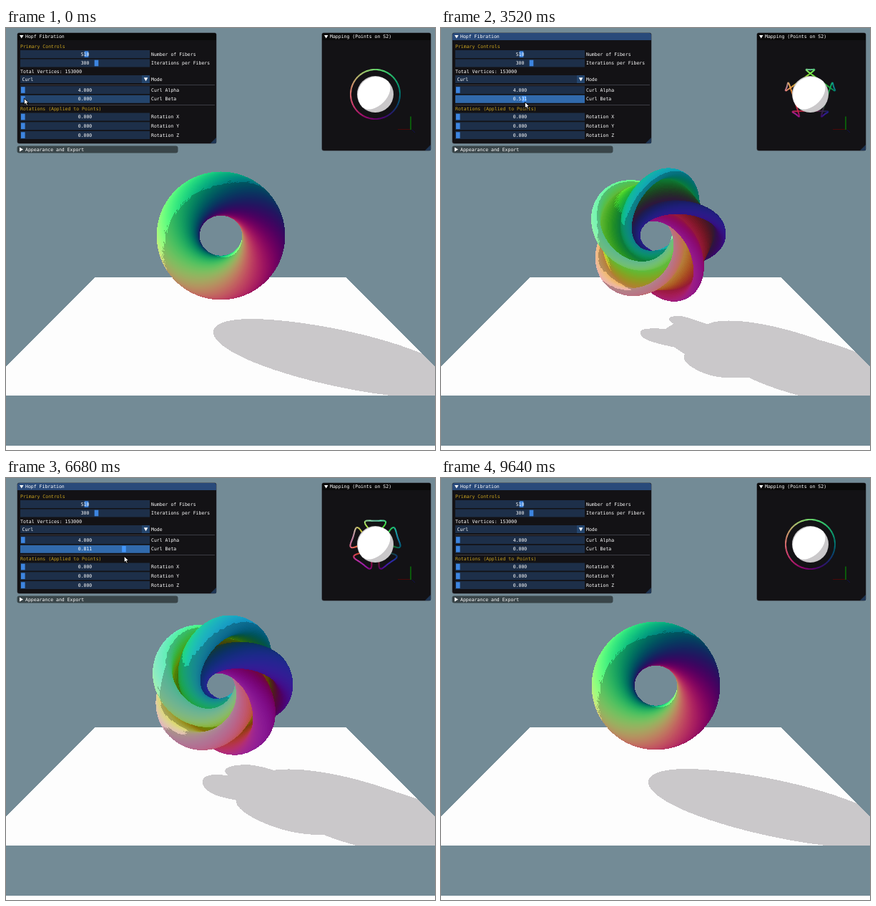
Animation of 600x589 px, one loop 9680 ms. Source, as an HTML page with a canvas:

```html
<!DOCTYPE html>
<html>
<head>
<meta charset="utf-8">
<title>Hopf Fibration</title>
<style>
html, body { margin: 0; height: 100%; overflow: hidden; }
canvas { display: block; width: 100vw; height: 100vh; }
</style>
</head>
<body>
<canvas id="stage" width="600" height="589"></canvas>
<script>
const ctx = document.getElementById('stage').getContext('2d');
const W = 600, H = 583, LOOP = 9680, TAU = 2 * Math.PI;
const SKY = 0xff968b73, GROUND = 0xfffdfdfd, SHADE = 0xffcac8ca;

// time, beta, cursor offset from the slider grab, cursor height
const KEYS = [
  [0, 0, 1.5, 98], [400, 0, 1.5, 98], [1000, .05, 2, 100], [1720, .292, 3, 101],
  [2720, .837, -.5, 101], [3050, .95, 0, 102], [3500, .55, 1, 103], [4000, .085, 1, 105],
  [4440, .032, 0, 106], [4700, .025, 0, 106], [5000, .1, 2, 106], [5680, .776, 5, 106],
  [6200, 1, 4, 107], [6700, .8, 0, 109], [7000, .52, -3, 110], [7600, .202, -5.5, 111],
  [8000, .07, -4, 112], [8800, 0, -2, 112], [LOOP, 0, -2, 112]
];
const PRESS = 400, RELEASE = 9200;

// Monotone cubic interpolation of one column of KEYS
function track(time, col) {
  const rise = k => KEYS[k] && KEYS[k + 1]
    ? (KEYS[k + 1][col] - KEYS[k][col]) / (KEYS[k + 1][0] - KEYS[k][0]) : 0;
  const tangent = k => {
    const a = rise(k - 1), b = rise(k);
    return a * b > 0 ? 2 * a * b / (a + b) : 0;
  };
  let k = 0;
  while (k < KEYS.length - 2 && time >= KEYS[k + 1][0]) k++;
  const span = KEYS[k + 1][0] - KEYS[k][0], u = (time - KEYS[k][0]) / span, v = 1 - u;
  return v * v * (1 + 2 * u) * KEYS[k][col] + u * u * (3 - 2 * u) * KEYS[k + 1][col]
    + span * u * v * (v * tangent(k) - u * tangent(k + 1));
}

// ---- scene ----
const FIBERS = 320, STEPS = 110, COUNT = FIBERS * STEPS;
const points = () => ({ x: new Float32Array(COUNT), y: new Float32Array(COUNT), z: new Float32Array(COUNT) });
const world = points(), view = points(), cast = points(), light = points();
const tint = Array.from({ length: FIBERS }, () => [0, 0, 0]);
const depth = new Float32Array(W * H), lightDepth = new Float32Array(W * H);
const image = ctx.createImageData(W, 589);
const pixels = new Uint32Array(image.data.buffer);

const backdrop = new Uint32Array(pixels.length).fill(SKY);
for (let y = 348; y < 513; y++) {
  const half = y - 172;
  backdrop.fill(GROUND, y * W + Math.max(0, 300 - half), y * W + Math.min(W, 300 + half));
}
backdrop.fill(0xffffffff, H * W);

const CAM_Y = 1, CAM_Z = 6, DIST = Math.hypot(CAM_Y, CAM_Z);
const SIN = CAM_Y / DIST, COS = CAM_Z / DIST, FOCAL = 725;
function project(out, n, x, y, z) {
  const inv = 1 / (DIST - y * SIN - z * COS);
  out.x[n] = 300 + FOCAL * x * inv;
  out.y[n] = 290 - FOCAL * (y * COS - z * SIN) * inv;
  out.z[n] = inv;
}

// Curl curve in the plane, lifted to the sphere by inverse stereographic projection
function basePoint(t, beta) {
  const re = -Math.sin(t) + beta * Math.sin(4 * t);
  const im = Math.cos(t) + beta * Math.cos(4 * t);
  const r = Math.hypot(re, im), s = 1 + r * r;
  return { r, angle: Math.atan2(im, re), x: 2 * re / s, y: 2 * im / s, z: (r * r - 1) / s };
}
const colorOf = p => [(1 - p.x) * 127.5, (1 + p.y) * 127.5, (1 + p.z) * 127.5];

function buildFibers(beta) {
  const far = 20;
  for (let i = 0, n = 0; i < FIBERS; i++) {
    const p = basePoint(TAU * i / FIBERS, beta);
    tint[i] = colorOf(p);
    const c = 1 / Math.hypot(1, p.r), s = p.r * c;
    for (let j = 0; j < STEPS; j++, n++) {
      const g = TAU * j / STEPS, a = p.angle - g - .7 * Math.PI, w = s * Math.cos(g);
      const k = Math.acos(w) / Math.PI / Math.sqrt(1 - w * w);
      const x = world.x[n] = k * c * Math.cos(a);
      const y = world.y[n] = k * c * Math.sin(a);
      const z = world.z[n] = k * s * Math.sin(g);
      project(view, n, x, y, z);
      const m = (far + 1) / (far - y);
      project(cast, n, (x + far) * m - far, -1, (z + far) * m - far);
      light.x[n] = 300 + 85 * (x - z);
      light.y[n] = 290 + 49 * (x + 2 * y + z);
      light.z[n] = .577 * (y - x - z);
    }
  }
}

function fillTriangle(p, a, b, c, plot) {
  const ax = p.x[a], ay = p.y[a], az = p.z[a];
  const ux = p.x[b] - ax, uy = p.y[b] - ay, vx = p.x[c] - ax, vy = p.y[c] - ay;
  const det = ux * vy - uy * vx;
  if (!det) return;
  const du = p.z[b] - az, dv = p.z[c] - az;
  const left = Math.max(0, Math.ceil(ax + Math.min(0, ux, vx)));
  const right = Math.min(W - 1, ax + Math.max(0, ux, vx));
  const bottom = Math.min(H - 1, ay + Math.max(0, uy, vy));
  for (let y = Math.max(0, Math.ceil(ay + Math.min(0, uy, vy))); y <= bottom; y++) {
    for (let x = left; x <= right; x++) {
      const px = x - ax, py = y - ay;
      const u = (px * vy - py * vx) / det, v = (ux * py - uy * px) / det;
      if (u > -1e-4 && v > -1e-4 && u + v < 1.0001) plot(y * W + x, az + u * du + v * dv);
    }
  }
}

function eachQuad(visit) {
  for (let i = 0; i < FIBERS; i++) {
    const row = i * STEPS, next = (i + 1) % FIBERS * STEPS;
    for (let j = 0; j < STEPS; j++) {
      const k = (j + 1) % STEPS;
      visit(row + j, row + k, next + j, next + k, i);
    }
  }
}
function fillQuad(p, a, b, c, d, plot) {
  fillTriangle(p, a, b, c, plot);
  fillTriangle(p, b, d, c, plot);
}

function isLit(a, b, c, d) {
  const { x, y, z } = world;
  const ux = x[d] - x[a], uy = y[d] - y[a], uz = z[d] - z[a];
  const vx = x[c] - x[b], vy = y[c] - y[b], vz = z[c] - z[b];
  const nx = uy * vz - uz * vy, ny = uz * vx - ux * vz, nz = ux * vy - uy * vx;
  const facing = -nx * x[a] + ny * (CAM_Y - y[a]) + nz * (CAM_Z - z[a]);
  if ((ny - nx - nz) * facing <= 0) return false;
  const spot = Math.round(light.y[a]) * W + Math.round(light.x[a]);
  return light.z[a] > lightDepth[spot] - .04;
}

function drawScene(beta) {
  buildFibers(beta);
  pixels.set(backdrop);
  depth.fill(0);
  lightDepth.fill(-9);
  const plotLight = (n, z) => { if (z > lightDepth[n]) lightDepth[n] = z; };
  const plotCast = n => { if (pixels[n] === GROUND) pixels[n] = SHADE; };
  eachQuad((a, b, c, d) => {
    fillQuad(light, a, b, c, d, plotLight);
    fillQuad(cast, a, b, c, d, plotCast);
  });
  let color;
  const plotView = (n, z) => {
    if (z > depth[n]) { depth[n] = z; pixels[n] = color; }
  };
  eachQuad((a, b, c, d, i) => {
    const k = isLit(a, b, c, d) ? 1 : .76, [red, green, blue] = tint[i];
    color = (255 << 24 | blue * k << 16 | green * k << 8 | red * k) >>> 0;
    fillQuad(view, a, b, c, d, plotView);
  });
  ctx.putImageData(image, 0, 0);
}

// ---- interface ----
function box(x, y, w, h, color, radius = 0) {
  ctx.fillStyle = color;
  ctx.beginPath();
  ctx.roundRect(x, y, w, h, radius);
  ctx.fill();
}
function poly(color, ...xy) {
  ctx.fillStyle = color;
  ctx.beginPath();
  for (let i = 0; i < xy.length; i += 2) ctx.lineTo(xy[i], xy[i + 1]);
  ctx.closePath();
  ctx.fill();
}
function line(x1, y1, x2, y2, color, width) {
  ctx.strokeStyle = color;
  ctx.lineWidth = width;
  ctx.beginPath();
  ctx.moveTo(x1, y1);
  ctx.lineTo(x2, y2);
  ctx.stroke();
}
function label(text, x, y, color = '#fff', align = 'left') {
  ctx.fillStyle = color;
  ctx.textAlign = align;
  ctx.fillText(text, x, y);
}
function panel(x, y, w, h, title, titleColor) {
  box(x - .5, y - .5, w + 1, h + 1, '#43474f', 3);
  box(x, y, w, h, '#131215', 3);
  box(x, y, w, 10, titleColor, [3, 3, 0, 0]);
  poly('#fff', x + 3, y + 3, x + 8.5, y + 3, x + 5.75, y + 7.5);
  label(title, x + 11, y + 5.5);
  poly('#1f3654', x + w, y + h - 8, x + w, y + h, x + w - 8, y + h);
}
function slider(y, name, value, grab, frame = '#1d2f49', knob = '#3d85e0') {
  box(20, y - 5.5, 181, 11, frame);
  box(grab - 2.8, y - 4.3, 5.6, 8.6, knob);
  label(value, 110.5, y + .5, '#fff', 'center');
  label(name, 203, y + .5);
}

function drawControls(time, beta) {
  const pressed = time >= PRESS && time < RELEASE, hovered = time < PRESS;
  panel(16, 7, 278, 154, 'Hopf Fibration', time >= PRESS ? '#294a7a' : '#0a0a0a');
  const gold = '#c9a21f', rule = '#3c3c44';
  label('Primary Controls', 20, 26, gold);
  slider(36.5, 'Number of Fibers', '510', 112.5);
  slider(49, 'Iterations per Fibers', '300', 126.5);
  label('Total Vertices: 153000', 20, 61);
  box(20, 66, 181, 11, '#1d2f49');
  box(190, 66, 11, 11, '#24456d');
  poly('#fff', 192.8, 69.3, 198.4, 69.3, 195.6, 74.2);
  label('Curl', 22.5, 72);
  label('Mode', 203, 72);
  line(20, 79.5, 292, 79.5, rule, 1);
  slider(86.5, 'Curl Alpha', '4.000', 23.8);
  slider(99.2, 'Curl Beta', beta.toFixed(3), 23.8 + 174 * beta,
    pressed ? '#316aac' : hovered ? '#24456d' : '#1d2f49', pressed ? '#4296fa' : '#3d85e0');
  line(20, 107.5, 292, 107.5, rule, 1);
  label('Rotations (Applied to Points)', 20, 113.3, gold);
  ['X', 'Y', 'Z'].forEach((axis, i) => slider(124 + 12.8 * i, 'Rotation ' + axis, '0.000', 23.8));

  box(15.5, 164.5, 225, 10, '#394549', 3);
  poly('#fff', 19, 166.5, 24, 169.5, 19, 172.5);
  label('Appearance and Export', 27, 170);
}

function drawMapping(beta) {
  panel(442, 7, 152, 164, 'Mapping (Points on S2)', '#0a0a0a');
  line(548, 141.5, 565, 141.5, '#4a0808', 1);
  line(568, 142, 572, 146, '#10104a', 1);
  line(566, 123.5, 566, 142, '#0b5a0b', 2);

  const cx = 516.5, cy = 92.5, n = 240;
  let from;
  for (let i = 0; i <= n; i++) {
    const p = basePoint(TAU * i / n, beta), k = 34.5 * 5 / (5 - p.z);
    const to = [cx + k * p.x, cy - k * p.y];
    if (from) line(...from, ...to, `rgb(${colorOf(p).map(Math.round)})`, 2);
    from = to;
  }
  box(cx - 25.5, cy - 25.5, 51, 51, '#cac8ca', 25.5);
  ctx.fillStyle = '#fff';
  ctx.fill(new Path2D('M534.5 74.5A25.5 25.5 0 0 0 498.5 110.5A25.5 17 -45 0 0 534.5 74.5'));
}

function drawCursor(x, y) {
  ctx.save();
  ctx.translate(x, y);
  ctx.strokeStyle = '#000';
  ctx.lineWidth = 1;
  poly('#fff', 0, 0, 0, 9, 2.1, 7.2, 3.6, 10.4, 5.2, 9.7, 3.7, 6.6, 6.5, 6.4);
  ctx.stroke();
  ctx.restore();
}

let shown = -1;
function frame() {
  const time = Math.floor(performance.now() % LOOP / 40) * 40;
  if (time !== shown) {
    shown = time;
    const beta = track(time, 1);
    drawScene(beta);
    ctx.font = '6.5px "DejaVu Sans Mono", monospace';
    ctx.textBaseline = 'middle';
    drawControls(time, beta);
    drawMapping(beta);
    if (time < RELEASE) drawCursor(23.8 + 174 * beta + track(time, 2), track(time, 3));
  }
  requestAnimationFrame(frame);
}
frame();
</script>
</body>
</html>
```
